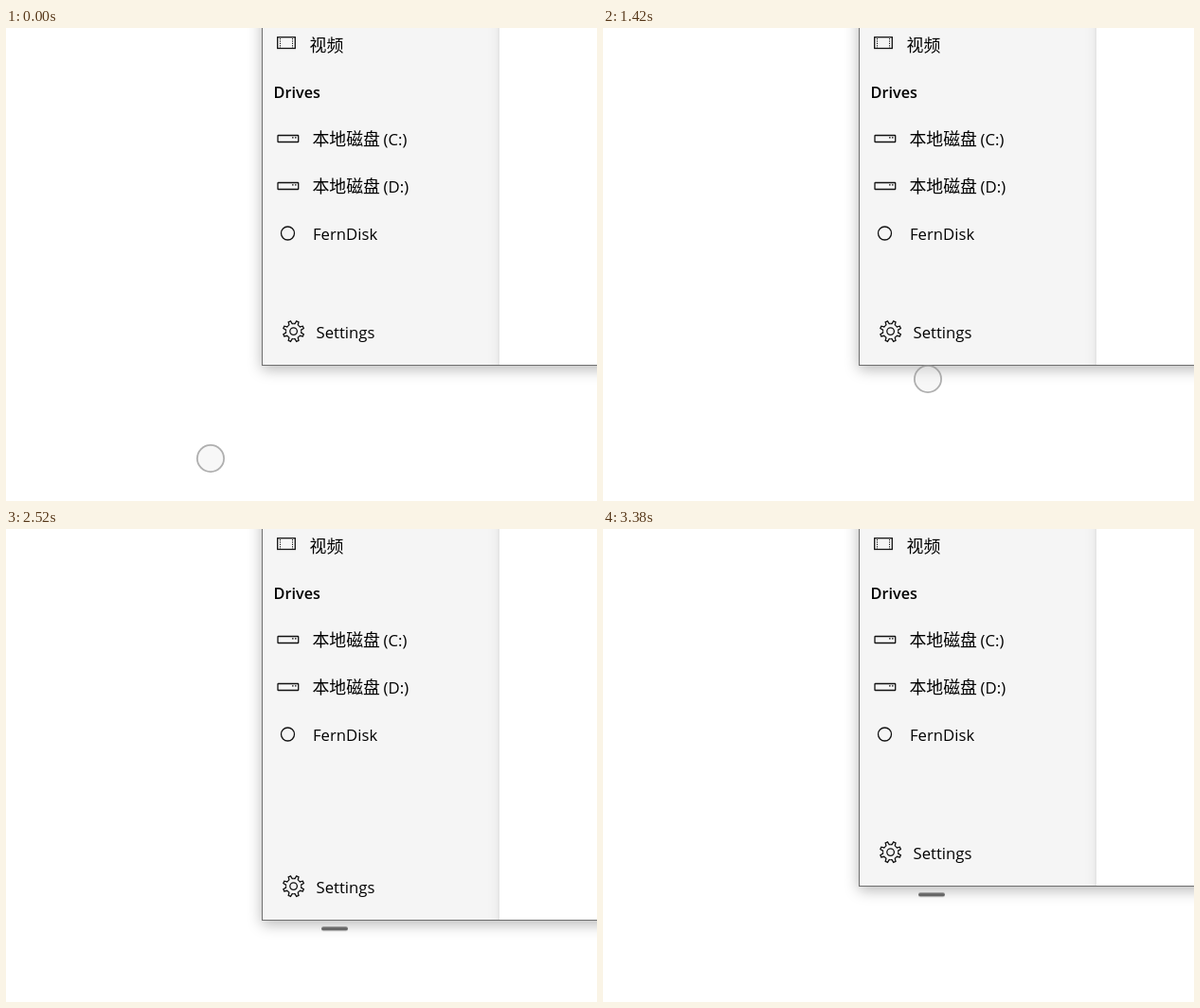
These frames come from a looping animation (624 by 500 pixels, 3.6 s). An HTML page:

```html
<!DOCTYPE html>
<html lang="zh-CN">
<head>
<meta charset="utf-8">
<title>Window resize pointer</title>
<style>
@property --drop {
  syntax: '<integer>';
  inherits: true;
  initial-value: 0;
}
html, body {
  margin: 0;
  width: 100%;
  height: 100%;
  overflow: hidden;
  background: #fff;
}
.stage {
  position: relative;
  width: 624px;
  height: 500px;
  overflow: hidden;
  animation: drag 3600ms infinite;
}
.window {
  position: absolute;
  left: 270px;
  top: -60px;
  width: 500px;
  height: calc(415px + var(--drop) * 1px);
  overflow: hidden;
  background: #f5f5f5;
  border: 1px solid #6e6e6e;
  box-shadow: 0 4px 14px rgba(0, 0, 0, .28);
}
.pane {
  position: absolute;
  inset: -30px 0 -30px 250px;
  background: #fff;
  box-shadow: 0 0 4px rgba(0, 0, 0, .08), 0 0 14px rgba(0, 0, 0, .08);
}
svg { position: absolute; inset: 0; }
text {
  font: 16.7px "Open Sans", "Noto Sans CJK SC", "Noto Sans CJK", sans-serif;
  fill: #000;
}
.cjk { font: 300 17.9px "Noto Sans CJK SC", "Noto Sans CJK", sans-serif; }
.head { font-weight: 600; font-size: 16.2px; }
.icon { fill: none; stroke: #111; stroke-width: 1.3; }
.follow { transform: translateY(calc(var(--drop) * 1px)); }
.layer { position: absolute; inset: 0; }
.pointer {
  position: absolute;
  left: 0;
  top: 0;
  transform: translate(-50%, -50%);
  animation: move 3600ms infinite, morph 3600ms infinite;
}
@keyframes drag {
  0%, 52.76% { --drop: 0; animation-timing-function: step-end; }
  52.77%, 53.8% { --drop: 1; animation-timing-function: cubic-bezier(.35, .1, .6, .9); }
  61.667% { --drop: 51; animation-timing-function: ease-out; }
  67.222% { --drop: 54; animation-timing-function: linear; }
  70%, 80% { --drop: 57; animation-timing-function: linear; }
  82.2%, 83.3% { --drop: 56; animation-timing-function: cubic-bezier(.35, .1, .6, .95); }
  93.8%, 100% { --drop: 21; }
}
@keyframes move {
  0%, 1.111% { translate: 216px 455px; animation-timing-function: cubic-bezier(.3, .1, .7, .5); }
  15.556% { translate: 259px 442px; animation-timing-function: linear; }
  23.333% { translate: 294px 421px; animation-timing-function: linear; }
  30.556% { translate: 322px 396px; animation-timing-function: cubic-bezier(.3, .42, .7, .82); }
  39.444%, 40% { translate: 343px 371px; animation-timing-function: ease-out; }
  45%, 100% { translate: 347px 365.3px; }
}
@keyframes morph {
  0%, 40% {
    width: 30px;
    height: 30px;
    border-radius: 15px;
    background: rgba(235, 235, 235, .4);
    box-shadow: inset 0 0 0 1.8px rgba(110, 110, 110, .52);
    animation-timing-function: ease-in-out;
  }
  45% {
    width: 29px;
    height: 3.5px;
    border-radius: 2px;
    background: rgba(125, 125, 125, .9);
    box-shadow: inset 0 0 0 1.8px rgba(110, 110, 110, .2);
  }
  48.333%, 100% {
    width: 28px;
    height: 3.5px;
    border-radius: 2px;
    background: #666;
    box-shadow: inset 0 0 0 1.8px rgba(110, 110, 110, 0);
  }
}
</style>
</head>
<body>
<div class="stage">
  <div class="window"><div class="pane"></div></div>
  <svg width="624" height="500">
    <defs>
      <g id="drive">
        <rect x="287" y="-3.5" width="21.7" height="7" rx=".6"/>
        <path d="M302 -1.2h1.6M305 -1.2h1.6"/>
      </g>
      <path id="tooth" d="M-3.1 -7.5L-1.75 -8L-1.25 -11.1H1.25L1.75 -8L3.1 -7.5"/>
      <g id="side">
        <use href="#tooth" transform="rotate(22.5)"/>
        <use href="#tooth" transform="rotate(67.5)"/>
      </g>
    </defs>

    <g class="icon">
      <rect x="286.7" y="9.7" width="18.6" height="11.8"/>
      <path d="M289.5 11v10M302.5 11v10" stroke-dasharray="1.2 1.2" stroke-width="1"/>
      <use href="#drive" y="117"/>
      <use href="#drive" y="167"/>
      <circle cx="297.5" cy="217" r="7"/>
    </g>

    <text class="cjk" x="320.5" y="24.5">视频</text>
    <text class="head" x="282.6" y="74">Drives</text>
    <text class="cjk" x="323.4" y="124.3">本地磁盘</text>
    <text x="398.6" y="124">(C:)</text>
    <text class="cjk" x="323.4" y="174.3">本地磁盘</text>
    <text x="398.6" y="174">(D:)</text>
    <text x="324" y="224">FernDisk</text>

    <g class="follow">
      <g class="icon" transform="translate(303.6 320.6)">
        <use href="#side"/>
        <use href="#side" transform="rotate(90)"/>
        <use href="#side" transform="rotate(180)"/>
        <use href="#side" transform="rotate(270)"/>
        <circle r="3.8"/>
      </g>
      <text x="327.5" y="328">Settings</text>
    </g>
  </svg>
  <div class="layer follow"><div class="pointer"></div></div>
</div>
</body>
</html>
```
